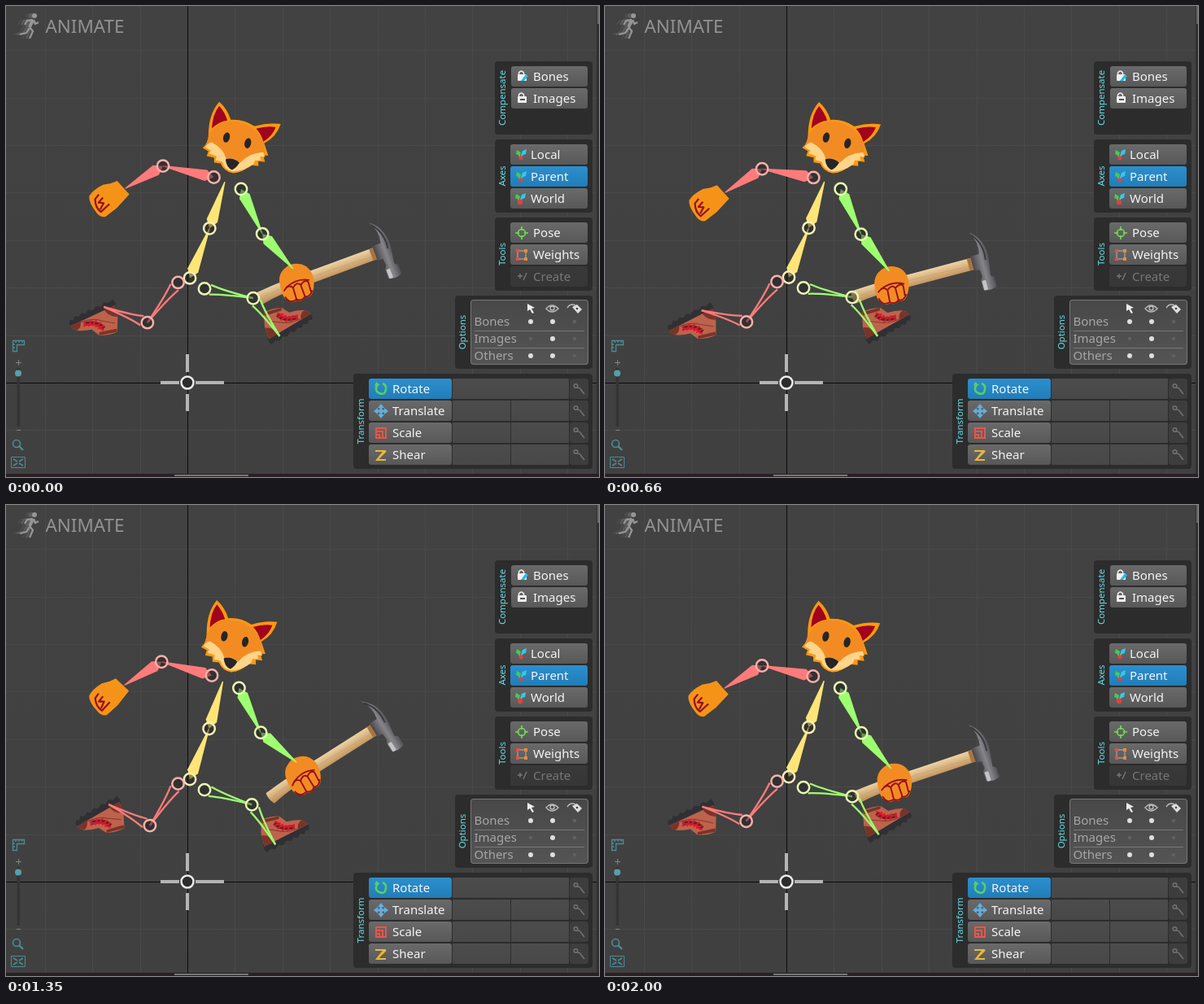
Recreate the animation shown at these times as an HTML page with a canvas. Size 729 by 579 pixels, loop 2030 ms.

```html
<!DOCTYPE html>
<html lang="en">
<head>
<meta charset="utf-8">
<title>Run cycle</title>
<style>
html, body { margin: 0; width: 100%; height: 100%; overflow: hidden; background: #404040; }
canvas { display: block; }
</style>
</head>
<body>
<canvas id="stage" width="729" height="579"></canvas>
<script>
const W = 729, H = 579, LOOP = 2030, CYCLE = 667, RAD = Math.PI / 180;
const stage = document.getElementById('stage');
const panel = document.createElement('canvas');
panel.width = W; panel.height = H;
let g = panel.getContext('2d');

// ---------- drawing helpers ----------
function box(x, y, w, h, fill, r = 0) {
  g.fillStyle = fill;
  g.beginPath(); g.roundRect(x, y, w, h, r); g.fill();
}
function shape(d, fill) { g.fillStyle = fill; g.fill(new Path2D(d)); }
function line(d, color, width = 1) {
  g.strokeStyle = color; g.lineWidth = width;
  g.stroke(new Path2D(d));
}
function dot(x, y, r, fill, stroke, width = 2.5) {
  g.beginPath(); g.arc(x, y, r, 0, 7);
  if (fill) { g.fillStyle = fill; g.fill(); }
  if (stroke) { g.strokeStyle = stroke; g.lineWidth = width; g.stroke(); }
}
function text(s, x, y, color = '#f2f2f2', size = 15) {
  g.font = size + 'px "Noto Sans", "Open Sans", sans-serif';
  g.fillStyle = color; g.fillText(s, x, y);
}
function at(x, y, deg, draw) {
  g.save(); g.translate(x, y); g.rotate(deg * RAD); draw(); g.restore();
}
function fade(y, h, top, bottom) {
  const f = g.createLinearGradient(0, y, 0, y + h);
  f.addColorStop(0, top); f.addColorStop(1, bottom);
  return f;
}

// ---------- editor interface ----------
function group(label, x, y, w, h) {
  box(x, y, w, h, '#2c2c2c', 4);
  g.textAlign = 'center';
  at(x + 13, y + h / 2, -90, () => text(label, 0, 0, '#68dfe8', 11.5));
  g.textAlign = 'left';
}
function button(label, x, y, w, textX, look) {
  const fill = { on: ['#2c8fcd', '#217db8'], off: ['#393939', '#363636'] }[look] || ['#6a6a6a', '#585858'];
  box(x, y, w, 25, fade(y, 25, ...fill), 3);
  text(label, textX, y + 18, look === 'off' ? '#777' : '#f4f4f4');
}

// Small three-way axis mark: green up, red origin, cyan arrow.
function axisMark(x, y, bold) {
  line(`M${x - 3} ${y - 4}L${x} ${y + 4}L${x + 5} ${y - 3}`, '#8aa0a8', 1.5);
  shape(`M${x - 5} ${y - 1}l1 -5 5 3 -1 4z`, '#3fcf50');
  dot(x + 1, y + 4, bold ? 3.2 : 2.5, '#e6403c');
  shape(`M${x + 1} ${y + 1}l2 -6 5 -2 -1 6z`, '#35c8e8');
}

function drawIcons() {
  for (const y of [87, 114]) {
    box(629, y - 3, 11, 8, '#f0f0f0', 1);
    line(`M630.500 ${y - 3}v-2q3 -4 6 0v2`, '#f0f0f0', 1.5);
  }
  shape('M633 92l6 -8 3 2 -5 6z', '#22bde8');
  line('M632 115h6', '#555', 2);
  axisMark(632, 183); axisMark(632, 210); axisMark(631, 237, true);

  dot(634, 279, 4.5, 0, '#6fe04e', 1.6);
  line('M634 271v5M634 282v5M626 279h5M637 279h5', '#6fe04e', 1.6);
  line('M629 301h10v10h-10z', '#999', 1.5);
  for (const [x, y] of [[629, 301], [639, 301], [629, 311], [639, 311]])
    box(x - 2, y - 2, 4, 4, x > 630 ? '#f08a30' : '#e85040');
  line('M629 332h6M632 329v6M636 337l4 -9', '#777', 1.4);

  line('M457 465q-5 8 2 11t8 -5q1 -5 -4 -7', '#58d060', 2.5);
  shape('M453 467l2 -5 5 4z', '#58d060');
  line('M455 498h12M461 492v12', '#62aee0', 3);
  shape('M461 489l4 5h-8zM461 507l4 -5h-8zM452 498l5 -4v8zM470 498l-5 -4v8z', '#62aee0');
  line('M455 519h12v12h-12zM455 523h8v8M455 527h4v4', '#e8554a', 2);
  line('M454 547h11l-9 11h11M456 558l11 -11', '#e8b83a', 2);
  for (let i = 0; i < 4; i++) {
    const y = 471 + 27 * i;
    dot(700.5, y - 4, 2.3, 0, '#707070', 1.6);
    line(`M702 ${y - 2}q4 0 5 3l4 5`, '#707070', 1.7);
  }

  shape('M641 366l9 5 -4 1 3 5 -2 1 -3 -5 -3 2z', '#eee');
  line('M664 372q7 -8 15 0q-8 8 -15 0z', '#bbb', 1.4);
  dot(671.5, 371.5, 2.5, 0, '#bbb', 1.4);
  line('M690 371q4 -6 10 -3', '#bbb', 1.5);
  shape('M696 370l6 -3 6 6 -5 5z', '#ddd');
  dot(702, 372, 1.3, '#444');
}

function drawSideTools() {
  const teal = '#4b8c95';
  line('M8.500 411.500h14v5h-9v8h-5zM12 412v2M16 412v2M20 412v2M9 416h2M9 420h2', teal, 1.3);
  line('M12 438.500h7M15.500 435v7M13 521.500h5', '#858585');
  box(13.500, 445, 3.500, 72, '#343434');
  dot(15, 451.500, 4, '#579fa9');
  dot(13, 538, 4.500, 0, teal, 1.6);
  line('M16 541l5 5', teal, 2.4);
  line('M6.500 554.500h17v13h-17z', teal);
  line('M9 557l5 3M21 557l-5 3M9 565l5 -3M21 565l-5 -3', teal, 1.5);
}

function drawRunner(x, color) {
  at(x, 0, 0, () => {
    dot(1, 12, 3, color);
    line('M-1 17L-5 26', color, 4);
    line('M-5 26L-1 31 -5 40M-5 27L-9 33 -17 35M-1 17L-8 18 -11 23M0 17L2 22 6 20', color, 2.3);
  });
}

function drawPanel() {
  box(0, 0, W, H, fade(0, H, '#424242', '#404040'));
  for (let i = -3; i < 9; i++) box(Math.round(223 + i * 58.4), 0, 1, H, '#494949');
  for (let i = -7; i < 2; i++) box(0, Math.round(463 + i * 58.4), W, 1, '#494949');
  box(223, 0, 1, H, '#0c0c0c'); box(0, 463, W, 1, '#0c0c0c');
  box(726, 0, 3, H, '#303030'); box(727, 0, 2, 22, '#666');
  box(0, 575, W, 4, '#2a2024'); box(207, 576, 91, 2, '#777');

  drawRunner(26, '#4b4b4b'); drawRunner(30, '#5c5c5c'); drawRunner(34, '#969696');
  text('ANIMATE', 48.5, 33, '#939393', 22.4);

  group('Compensate', 601, 68, 120, 90);
  group('Axes', 601, 164, 120, 90);
  group('Tools', 601, 260, 120, 90);
  group('Options', 552, 356, 169, 90);
  group('Transform', 427, 452, 294, 117);
  button('Bones', 621, 74, 94, 648);
  button('Images', 621, 101, 94, 648);
  button('Local', 620, 170, 95, 645);
  button('Parent', 620, 197, 95, 645, 'on');
  button('World', 620, 224, 95, 645);
  button('Pose', 620, 266, 95, 648);
  button('Weights', 620, 293, 95, 648);
  button('Create', 620, 320, 95, 648, 'off');

  box(571, 361, 145, 80, '#777', 4);
  box(572, 362, 143, 78, fade(362, 78, '#484848', '#545454'), 3);
  ['Bones', 'Images', 'Others'].forEach((s, i) => {
    const y = 388 + 21 * i;
    text(s, 575.500, y + 5, '#a6a6a6');
    if (i < 2) box(576, y + 11, 135, 1, '#787878');
    [i !== 1, true, false].forEach((on, k) => dot(645 + 27 * k, y, on ? 3 : 2.3, on ? '#dedede' : '#606060'));
  });

  ['Rotate', 'Translate', 'Scale', 'Shear'].forEach((s, i) => {
    const y = 458 + 27 * i;
    button(s, 446, y, 102, 475, i ? '' : 'on');
    box(549, y, 143, 25, fade(y, 25, '#4c4c4c', '#484848'));
    if (i) box(620, y, 1, 25, '#2c2c2c');
    box(693, y, 23, 25, '#3d3d3d', 3);
  });
  drawIcons();
  drawSideTools();
  line('M190 463h23M233 463h35M223 428v22M223 477v21', '#b5b5b5', 4);
  dot(223, 463, 7.5, '#2c2c2c', '#ececec');
}

// ---------- motion ----------
// Degrees at these points of the cycle; limbs hang down at 0, forward is positive.
const TIMES = [16, 100, 210, 336, 363, 440, 550, 660];
const ARM_R = [
  [-105, -108, -85, -42, -33, -1, -30, -99],
  [-58, -50, 0, 54, 50, 43, 20, -57],
  [141, 138, 80, 12, 15, 25, 80, 145]];
const ARM_G = [
  [26, 25, 0, -19, -21.5, -29, -8, 24],
  [50, 65, 45, 2, -2, -10, 5, 37],
  [-32, -60, -50, 2.5, 10, 52, 40, -14.3]];
const LEG_R = [
  [-34, -30, 20, 62.6, 61.4, 57, 10, -37],
  [-117, -135, -80, 32.6, 31, 26.6, 0, -103.5],
  [150, 147, 90, -41, -43, -50, 15, 152]];
const LEG_G = [
  [72.8, 60, 12, -48, -49.6, -68, 15, 78.7],
  [30.6, 27, 2, -110, -119, -136, -85, 32.3],
  [-27, -35, 10, 147, 149, 147, 70, -29]];
const PELVIS_Y = [337, 348, 331, 335, 337, 347.5, 330, 333.5];

// Smooth periodic curve through a track.
function sample(track, p) {
  const n = TIMES.length;
  const time = i => TIMES[(i + n) % n] + Math.floor(i / n) * CYCLE;
  const val = i => track[(i + n) % n];
  const slope = i => (val((i + 1) % n) - val(i - 1)) / (time(i + 1) - time(i - 1));
  let i = -1;
  while (time(i + 1) <= p) i++;
  const span = time(i + 1) - time(i), u = (p - time(i)) / span;
  const j = (i + 1) % n, k = (i + n) % n;
  const m0 = slope(k) * span, m1 = slope(j) * span;
  const a = val(k), b = val(j), u2 = u * u, u3 = u2 * u;
  return a * (2 * u3 - 3 * u2 + 1) + m0 * (u3 - 2 * u2 + u) + b * (3 * u2 - 2 * u3) + m1 * (u3 - u2);
}

function limb(x, y, tracks, p, upper, lower) {
  const [a, b, end] = tracks.map(t => sample(t, p));
  const reach = (q, deg, len) => ({ x: q.x + len * Math.sin(deg * RAD), y: q.y + len * Math.cos(deg * RAD) });
  const root = { x, y }, mid = reach(root, a, upper), tip = reach(mid, b, lower);
  return { root, mid, tip, end };
}

// ---------- character ----------
const RED = ['#ff7b7b', '#f6b0ac'], GREEN = ['#9dff70', '#e9f7b4'], YELLOW = ['#ffe577', '#f5f0b8'];
const FUR = '#f28c22', INK = '#96101a';

function drawHead() {
  g.translate(-277, -194);
  shape('M247 158Q247 132 260 117Q270 126 274 139Q290 138 303 147Q320 142 335 144Q330 160 315 168L320 183L314 183L316 191L308 190L308 196L299 195Q288 205 277 205Q266 203 262 193L254 192L254 186L245 184L247 178L240 174Q247 168 247 158Z', '#ff980f');
  shape('M248 158Q258 139 278 141Q302 143 314 165L316 180Q300 188 292 196L268 191Q256 178 243 174Z', FUR);
  shape('M251 150Q252 132 260 122Q267 130 270 140Q260 141 251 150ZM305 150Q318 146 329 148Q325 159 314 166Q311 156 305 150Z', '#a0041e');
  shape('M243 173Q246 168 251 167Q266 175 269 188Q276 184 286 192Q296 180 314 179L316 185L310 184L311 189L304 189L302 194Q290 203 277 203Q266 201 264 191L256 189L257 184L248 181L250 177Z', '#ffd58b');
  shape('M268 188Q277 185 285 192Q281 199 276 201Q269 198 268 188Z', '#272525');
  for (const [x, y] of [[269, 161], [295, 168]])
    at(x, y, 13, () => { g.fillStyle = '#272525'; g.beginPath(); g.ellipse(0, 0, 4, 6.3, 0, 0, 7); g.fill(); });
}

function drawShoe() {
  shape('M-15 -2L-13 -7 47 -7 47 0 44 3 41 1 37 5 33 2 28 5 24 2 19 5 14 2 8 5 3 2 -3 5 -7 2 -14 4Z', '#303034');
  shape('M-13 -4L-10 -19 -2 -35Q8 -35 20 -29L25 -19Q34 -17 41 -13Q47 -8 47 -4Z', '#bd634c');
  shape('M-13 -4L-10 -18Q-1 -14 1 -4ZM-2 -35L20 -29 18 -26 -3 -31ZM33 -4Q36 -12 42 -12Q47 -8 47 -4Z', '#793428');
  line('M-4 -24L10 -14Q17 -7 33 -5', '#8a4033', 1.2);
  line('M11 -24Q15 -12 31 -9', '#5b2622', 5);
  line('M12 -26l4 5M9 -21l9 0M11 -16l9 -2M15 -11l8 -4M21 -8l6 -6M28 -6l4 -6M14 -22Q17 -14 30 -10', '#e0162e', 2);
}

function drawFist() {
  shape('M0 -9L3 13 11 15 20 19Q34 21 42 17Q47 11 46 -4Q46 -12 40 -15L22 -14Z', '#f59319');
  line('M27 -5L41 -7Q44 1 38 10L31 12M40 -4L32 0L37 4L29 6', INK, 2.2);
}

function drawHammer() {
  const wood = fade(-8, 17, '#f1d7aa', '#c0935c');
  shape('M-50 -5Q-52 3 -48 11Q-20 6 10 8L106 8 106 -7 30 -7Q-10 -8 -50 -5Z', wood);
  line('M-44 3Q0 -2 100 3', '#cda56c', 1);
  box(98, -7, 7, 15, '#a8743f');
  const steel = g.createLinearGradient(103, 0, 126, 0);
  steel.addColorStop(0, '#47474b'); steel.addColorStop(.55, '#85858a'); steel.addColorStop(1, '#4c4c51');
  shape('M109 -38Q127 -23 124 0L121 20 125 23 125 35Q116 39 108 35L108 23 111 19 110 10 103 10 103 -9 114 -9Q118 -23 109 -38Z', steel);
  line('M111 -34Q123 -20 120 0', '#3a3a3e', 2);
  box(109, 24, 5, 12, '#c4c4c8', 1);
}

function drawGrip() {
  shape('M-20 -4Q-18 -20 0 -23Q20 -21 22 -3Q22 9 15 18Q10 25 4 21Q-2 26 -7 21Q-14 24 -17 17Q-23 14 -20 -4Z', FUR);
  line('M-18 5Q-10 -2 -6 5L-7 20M-6 5Q1 -1 4 5L4 20M4 5Q11 0 14 5L13 17M-19 12Q-17 23 -7 20Q-1 25 4 20Q9 24 15 16M-14 2Q2 -5 16 3', INK, 1.9);
}

function bone(a, b, color, hollow) {
  const len = Math.hypot(b.x - a.x, b.y - a.y);
  at(a.x, a.y, Math.atan2(b.y - a.y, b.x - a.x) / RAD, () => {
    if (hollow) {
      for (const s of [-1, 1]) line(`M7 ${s * 6}Q${len * .4} ${s * 2} ${len} 0`, color, 2.3);
    } else shape(`M0 0L10 -7L${len} -.6V.6L10 7Z`, color);
  });
}
function joints(color, ...points) {
  for (const q of points) dot(q.x, q.y, 7.2, 'rgba(30,28,28,.45)', color);
}
function drawLimb(l, [fill, ring], hollow) {
  bone(l.root, l.mid, fill, hollow);
  bone(l.mid, l.tip, fill, hollow);
  joints(ring, l.root, l.mid);
}

function drawFigure(p) {
  const c = Math.cos(2 * Math.PI * p / CYCLE), s = Math.sin(2 * Math.PI * p / CYCLE);
  const hipTurn = Math.max(-1, Math.min(1, 2 * c));
  const pelvis = { x: 226, y: sample(PELVIS_Y, p) };
  const drop = pelvis.y - 335.5;
  const waist = { x: 250 - .25 * drop, y: 274 + .6 * drop };
  const neck = { x: 268 - .9 * drop, y: 216.5 + .3 * drop };

  const armR = limb(neck.x - 13.5, 215.5 - 5 * c - 7 * s, ARM_R, p, 64, 54);
  const armG = limb(neck.x + 15 + 5 * c, 225, ARM_G, p, 61, 57);
  const legR = limb(pelvis.x - 14.5 * hipTurn, pelvis.y + 5.5, LEG_R, p, 62, 57);
  const legG = limb(pelvis.x + 1.5 + 16.5 * hipTurn, pelvis.y + 8.5 + 4.5 * hipTurn, LEG_G, p, 61, 57);

  at(legR.tip.x, legR.tip.y, legR.end, drawShoe);
  at(armR.tip.x, armR.tip.y, armR.end, drawFist);
  at(neck.x + 10, 194.5, 0, () => {
    g.scale(1 - .008 * drop, 1 + .004 * drop); // stretch on landing
    g.rotate(-.25 * drop * RAD);
    drawHead();
  });
  at(legG.tip.x, legG.tip.y, legG.end, drawShoe);
  at(armG.tip.x, armG.tip.y, armG.end, () => {
    g.translate(-2, 17);
    // The handle passes in front of the hand on the downswing.
    const order = armG.end > 30 ? [drawGrip, drawHammer] : [drawHammer, drawGrip];
    order.forEach(draw => draw());
  });

  bone(pelvis, waist, YELLOW[0]);
  bone(waist, neck, YELLOW[0]);
  joints(YELLOW[1], pelvis, waist);
  drawLimb(legR, RED, true);
  drawLimb(armR, RED);
  drawLimb(legG, GREEN, true);
  drawLimb(armG, GREEN);
}

drawPanel();
g = stage.getContext('2d');
g.lineJoin = 'round';
const start = performance.now();
function frame() {
  const t = Math.min((performance.now() - start) % LOOP, 2000); // last pose holds
  g.drawImage(panel, 0, 0);
  drawFigure(t % CYCLE);
  requestAnimationFrame(frame);
}
frame();
</script>
</body>
</html>
```
